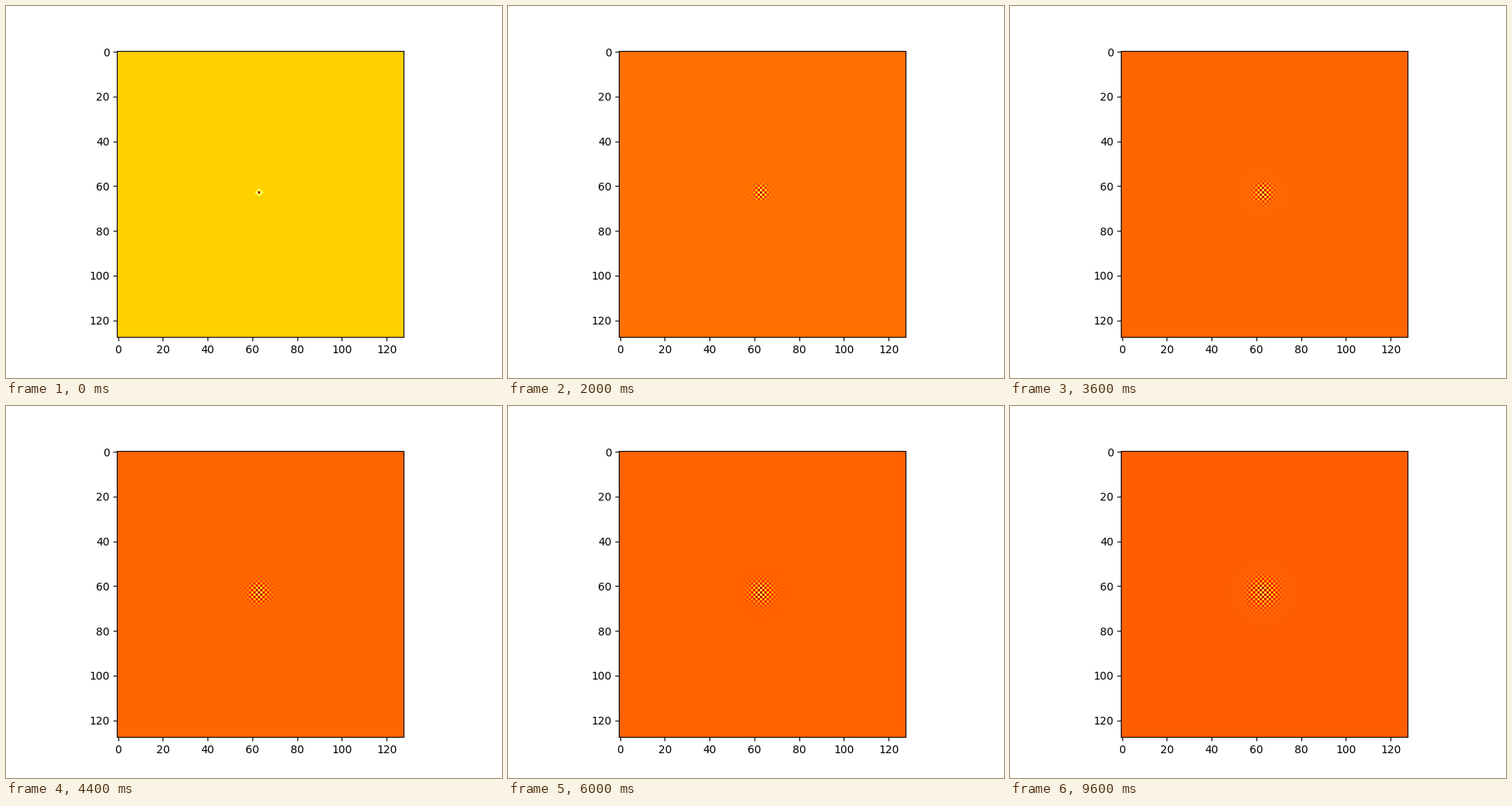
A matplotlib script that plays this animation: 640x480 px, repeating every 9.8 s.

```python
import matplotlib.pyplot as plt
import numpy as np
from matplotlib.animation import FuncAnimation

SIZE = 128
STEPS = 49
RATE = 0.52  # diffusion number, above the stability limit of 0.25


def diffuse(u):
    """One explicit step of the 2D heat equation, rescaled to avoid huge values."""
    neighbours = sum(np.roll(u, shift, axis) for axis in (0, 1) for shift in (-1, 1))
    u = u + RATE * (neighbours - 4 * u)
    return u / np.abs(u).max()


def simulate():
    u = np.zeros((SIZE, SIZE))
    u[SIZE // 2 - 1, SIZE // 2 - 1] = 1.0
    fields = []
    for _ in range(STEPS):
        u = diffuse(u)
        fields.append(u)
    return fields


fields = simulate()

fig, ax = plt.subplots(figsize=(6.4, 4.8), dpi=100)
image = ax.imshow(fields[0], cmap="hot")


def update(i):
    image.set_data(fields[i])
    image.set_clim(fields[i].min(), fields[i].max())
    return (image,)


anim = FuncAnimation(fig, update, frames=STEPS, interval=200, repeat=True, repeat_delay=0)
plt.show()
```
